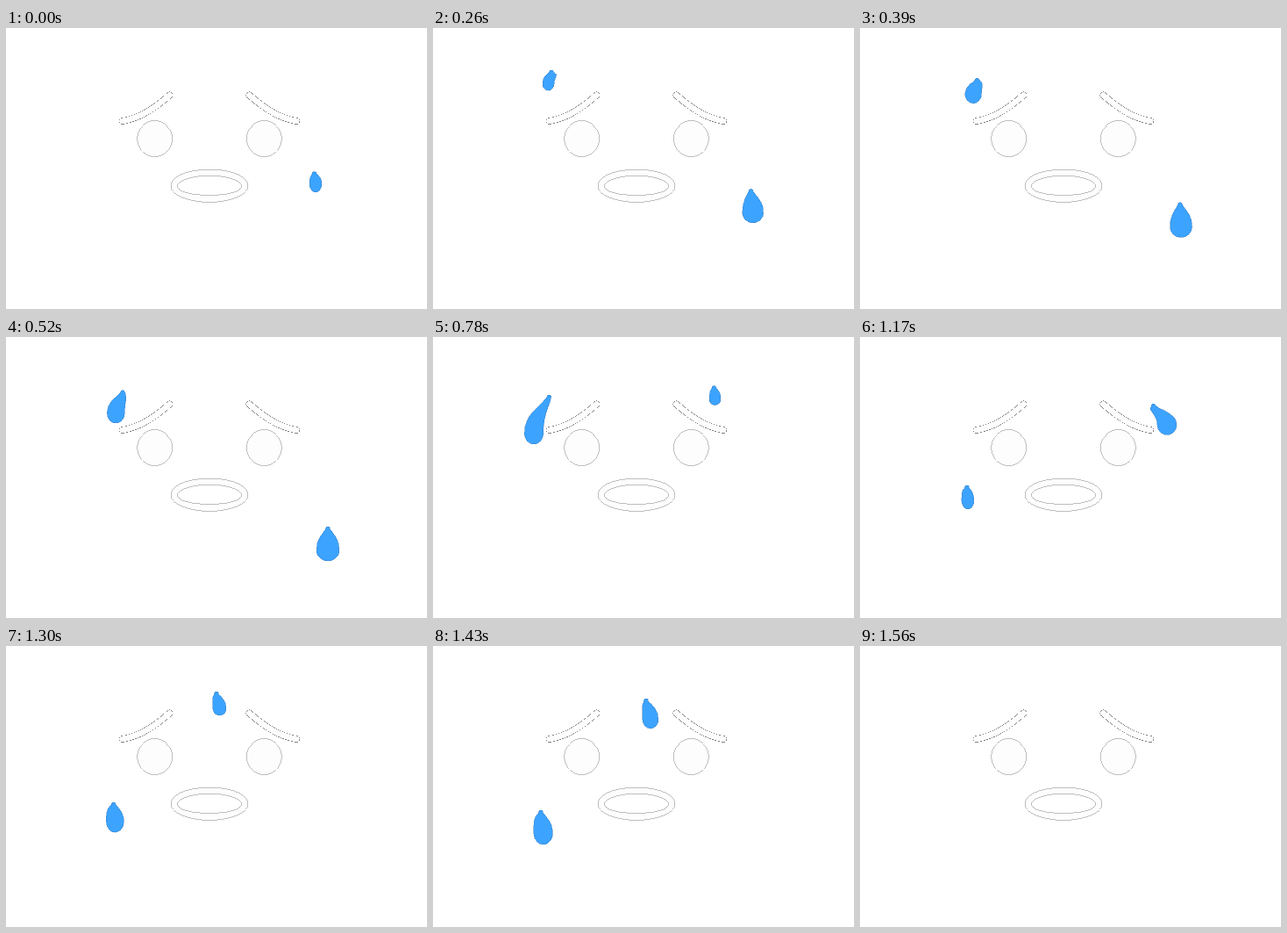
Recreate the animation shown at these times as an HTML page. Size 480 by 320 pixels, loop 1.69 s.

```html
<!DOCTYPE html>
<html lang="en">
<head>
<meta charset="utf-8">
<title>Worried face</title>
<style>
  html, body { margin: 0; width: 100%; height: 100%; overflow: hidden; background: #fff; }
  svg { display: block; width: 100vw; height: 100vh; shape-rendering: crispEdges; }
  .skin { fill: #fdfdfd; stroke: #808080; stroke-width: .5; }
  .edge, .brow { fill: none; stroke-linecap: round; }
  .edge { stroke: #808080; stroke-width: 7.6; }
  .brow { stroke: #fdfdfd; stroke-width: 6.7; }
  .drop { fill: #3ca3ff; stroke: #397fbd; stroke-width: .5; }
</style>
</head>
<body>
<svg viewBox="0 0 480 320">
  <defs>
    <g id="side">
      <path id="arch" class="edge" d="M186.5 76.5Q158 102 132.8 106"/>
      <path class="brow" d="M186.5 76.5Q158 102 132.8 106"/>
      <ellipse class="skin" cx="169.7" cy="126" rx="20" ry="20.5"/>
    </g>
  </defs>
  <use href="#side"/>
  <use href="#side" transform="matrix(-1 0 0 1 464 0)"/>
  <path class="skin" fill-rule="evenodd" d="
    M232 161.3C262 161.3 276 171 276 180C276 192 250 198.5 232 198.5C214 198.5 188 192 188 180C188 171 202 161.3 232 161.3Z
    M232 168.2C252 168.2 268.5 174 268.5 180C268.5 187 250 190.5 232 190.5C214 190.5 195.5 187 195.5 180C195.5 174 212 168.2 232 168.2Z"/>
  <g id="sweat"></g>
</svg>
<script>
const STEP = 130, COUNT = 13, CAP = 2.5;

// Each drop runs from its first pose to its last; fall and drift are easing powers
// for the tip's height and the belly's sideways motion.
const drops = [
  { start: 0, steps: 5, fall: 1.4, drift: .25, bend: [0, 0],
    tip: [[351.5, 163.5], [367, 216]], belly: [[353, 178], [367, 243]], size: [[7, 9], [13, 12]] },
  { start: 2, steps: 5, fall: .5, drift: 1.4, bend: [6, 0],
    tip: [[135, 48], [132.2, 66]], belly: [[131.5, 64], [115, 110]], size: [[6.5, 7], [10.7, 12]] },
  { start: 6, steps: 4, fall: 1, drift: .85, bend: [0, -6],
    tip: [[320.5, 55.5], [334.6, 76]], belly: [[321.5, 71], [350, 100]], size: [[6.5, 6.5], [11, 11.5]] },
  { start: 9, steps: 3, fall: 1, drift: 1, bend: [-2, -4],
    tip: [[122, 169], [123, 187]], belly: [[123, 187], [125.7, 213.5]], size: [[7, 9], [10.7, 12.5]] },
  { start: 10, steps: 2, fall: 1, drift: 1, bend: [-2, -2],
    tip: [[240, 52], [243, 60]], belly: [[243.5, 72], [248, 84]], size: [[7.5, 7], [9, 10]] }
];

const mix = (a, b, p, power = 1) => a + (b - a) * p ** power;
const mixPair = ([a, b], p, px, py) => [mix(a[0], b[0], p, px), mix(a[1], b[1], p, py)];

function outline(drop, p) {
  const [tx, ty] = mixPair(drop.tip, p, .5, drop.fall);
  const [cx, cy] = mixPair(drop.belly, p, drop.drift, 1);
  const [rx, ry] = mixPair(drop.size, p, .3, .3);
  const bend = mix(...drop.bend, p);
  const top = ty + CAP, midY = mix(ty, cy, .35), low = mix(cy, ty, .5);
  const midX = mix(tx, cx, .35), out = CAP + rx * .3;
  const left = midX - out + Math.min(bend, 0);
  const right = midX + out + Math.max(bend, 0);
  return `M${tx - CAP} ${top}A${CAP} ${CAP} 0 0 1 ${tx + CAP} ${top}` +
    `C${right} ${midY} ${cx + rx} ${low} ${cx + rx} ${cy}` +
    `A${rx} ${ry} 0 0 1 ${cx - rx} ${cy}` +
    `C${cx - rx} ${low} ${left} ${midY} ${tx - CAP} ${top}Z`;
}

const sweat = document.getElementById("sweat");
for (const drop of drops) {
  drop.el = document.createElementNS("http://www.w3.org/2000/svg", "path");
  drop.el.setAttribute("class", "drop");
  sweat.append(drop.el);
}

function show(step) {
  for (const drop of drops) {
    const age = step - drop.start;
    const alive = age >= 0 && age < drop.steps;
    drop.el.setAttribute("d", alive ? outline(drop, age / (drop.steps - 1)) : "");
  }
}

const origin = performance.now();
let shown = -1;
function tick() {
  const step = Math.floor((performance.now() - origin) / STEP) % COUNT;
  if (step !== shown) show(shown = step);
  requestAnimationFrame(tick);
}
tick();
</script>
</body>
</html>
```
